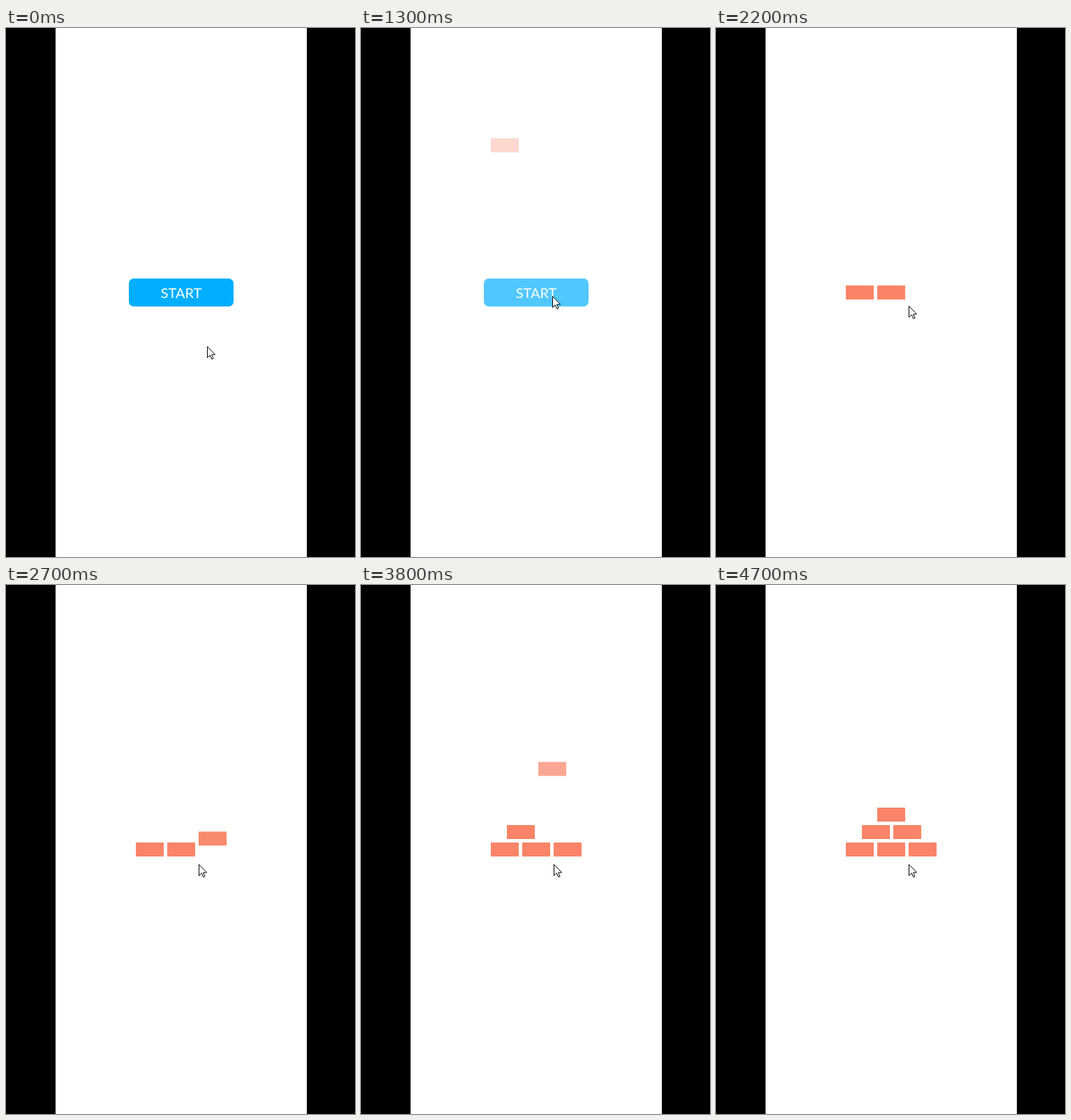
Recreate the animation shown at these times as an HTML page. Size 500x758 px, loop 5000 ms.

```html
<!DOCTYPE html>
<html lang="en">
<head>
<meta charset="utf-8">
<title>Brick stack</title>
<style>
  html, body { margin: 0; width: 100%; height: 100%; overflow: hidden; background: #000; }
  #stage { position: relative; width: 500px; height: 758px; overflow: hidden; }
  #page { position: absolute; left: 71px; top: 0; width: 360px; height: 758px; background: #fff; }
  #start {
    position: absolute; left: 176px; top: 359px; width: 150px; height: 40px;
    border-radius: 7px; background: #00aeff; color: #fff;
    font: 20px/40px Lato, sans-serif; text-align: center;
  }
  .brick { position: absolute; width: 40px; height: 20px; background: #fa8467; opacity: 0; }
  #cursor { position: absolute; left: 0; top: 0; width: 20px; height: 24px; overflow: visible; }
  #cursor path { fill: #fff; stroke: #000; stroke-width: 1; }
</style>
</head>
<body>
<div id="stage">
  <div id="page"></div>
  <div id="start">START</div>
  <svg id="cursor">
    <path id="arrow" d="M.5 .5V16.5L4.3 12.9L6.8 18.5L9 17.6L6.6 12H11.6Z"/>
    <path id="hand" d="M5.5 14V2a1.5 1.5 0 0 1 3 0V9V7.5a1.35 1.35 0 0 1 2.7 0V9.5V8.5a1.3 1.3 0 0 1 2.6 0V10.5V10a1.35 1.35 0 0 1 2.7 0V15L14.5 19V21.5H6.5V19L1 13Q0 10.8 1.6 10.5Q3 10.3 5.5 14Z"/>
  </svg>
</div>
<script>
  const LOOP = 5000, STEP = 100, FALL = 400, DROP = 310;
  const $ = id => document.getElementById(id);
  const stage = $('stage'), button = $('start'), cursor = $('cursor');

  // left, top, time the fall begins
  const bricks = [
    [186, 369, 1187], [231, 369, 1733], [276, 369, 2410],
    [208.5, 344, 3019], [253.5, 344, 3619], [231, 319, 4219]
  ].map(([x, y, at]) => {
    const el = document.createElement('div');
    el.className = 'brick';
    el.style.left = x + 'px';
    el.style.top = y + 'px';
    stage.insertBefore(el, cursor);
    return { el, at };
  });

  // time, x, y of the pointer
  const path = [
    [0, 288, 456], [600, 280, 403], [800, 274, 385], [1200, 274, 385],
    [1300, 274, 384], [1600, 274, 384], [1800, 274, 390], [2300, 276, 400], [LOOP, 276, 400]
  ];

  // cubic-bezier(.4, 0, .2, 1)
  function ease(x) {
    if (x <= 0) return 0;
    if (x >= 1) return 1;
    let lo = 0, hi = 1, s;
    for (let i = 0; i < 24; i++) {
      s = (lo + hi) / 2;
      const bx = 1.2 * (1 - s) ** 2 * s + 0.6 * (1 - s) * s * s + s ** 3;
      if (bx < x) lo = s; else hi = s;
    }
    return 3 * (1 - s) * s * s + s ** 3;
  }

  function pointerAt(t) {
    const i = path.findIndex(p => p[0] > t);
    const [t0, x0, y0] = path[i - 1], [t1, x1, y1] = path[i];
    const k = (t - t0) / (t1 - t0);
    return [Math.round(x0 + (x1 - x0) * k), Math.round(y0 + (y1 - y0) * k)];
  }

  function draw(t) {
    for (const { el, at } of bricks) {
      const p = ease((t - at) / FALL);
      el.style.opacity = p;
      el.style.transform = p < 1 ? `translateY(${(p - 1) * DROP}px)` : 'none';
    }
    button.style.opacity = 1 - ease((t - bricks[0].at) / FALL);

    const hover = t >= 600 && t < 1300;
    const [x, y] = pointerAt(t);
    $('hand').style.display = hover ? '' : 'none';
    $('arrow').style.display = hover ? 'none' : '';
    cursor.style.transform = `translate(${hover ? x - 5 : x}px, ${y}px)`;
  }

  let origin = null;
  function tick(now) {
    if (origin === null) origin = now;
    // the motion advances ten times a second
    draw(Math.floor((now - origin + 1) / STEP) * STEP % LOOP);
    requestAnimationFrame(tick);
  }
  draw(0);
  requestAnimationFrame(tick);
</script>
</body>
</html>
```
